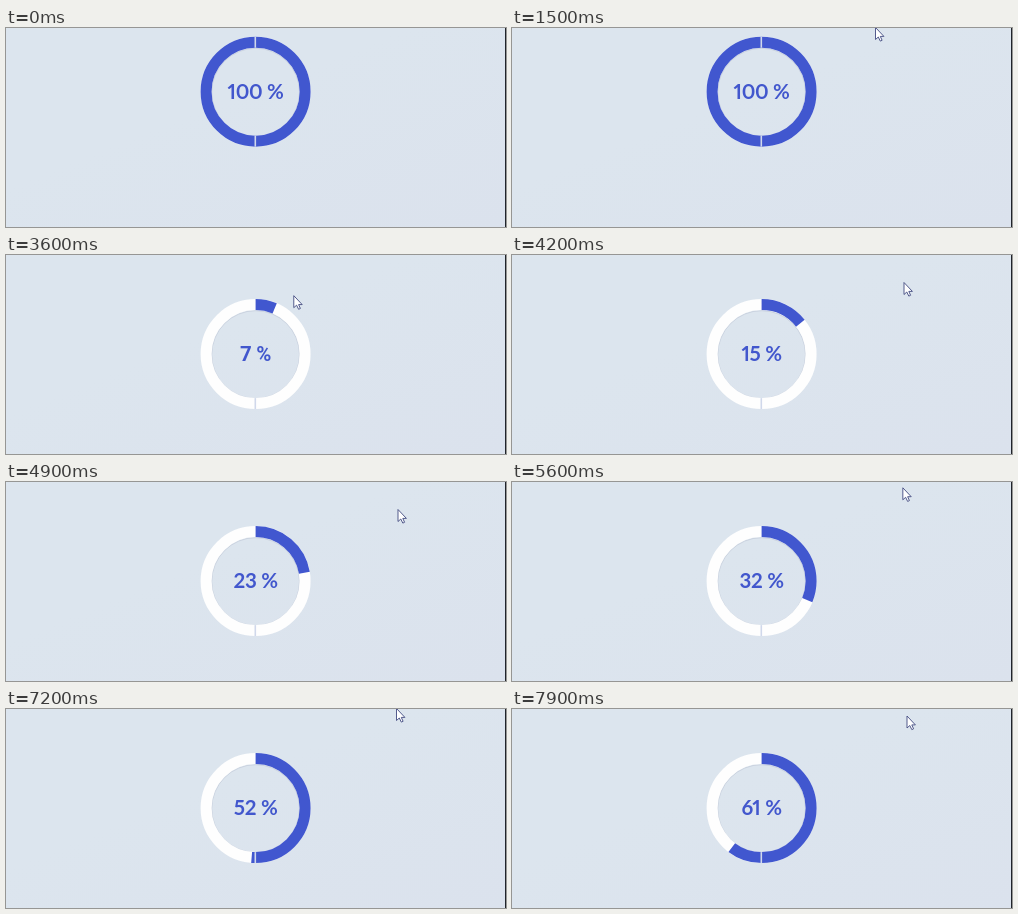
An HTML page for the animation above (8 s loop, 500x199 px).

```html
<!DOCTYPE html>
<html lang="en">
<head>
<meta charset="utf-8">
<title>Progress ring</title>
<style>
  html, body { margin: 0; width: 100%; height: 100%; overflow: hidden; background: #dce4ed; }
  svg { display: block; width: 500px; height: 199px; }
  text {
    font: 700 20.5px Lato, sans-serif;
    font-variant-numeric: proportional-nums;
    letter-spacing: -0.3px;
    fill: #4257cd;
    text-anchor: middle;
  }
  text.fallback { font: 700 20.5px Roboto, sans-serif; }
</style>
</head>
<body>
<svg viewBox="0 0 500 199">
  <defs>
    <linearGradient id="sky" x1="0" y1="0" x2="1" y2="1">
      <stop offset="0.4" stop-color="#dce5ee"/>
      <stop offset="1" stop-color="#dbe2ed"/>
    </linearGradient>
  </defs>
  <rect width="500" height="199" fill="url(#sky)"/>
  <rect x="499" width="1" height="199" fill="#20242b"/>
  <g id="ring" fill="none">
    <circle r="43.9" cy="0.5" stroke="#cbd3e0"/>
    <circle r="49.5" stroke="#fefefe" stroke-width="11"/>
    <circle id="arc" r="49.5" stroke="#4157cf" stroke-width="11" pathLength="100" transform="rotate(-90)"/>
    <g stroke="#d0d8eb" stroke-width="1.6">
      <path id="topSeam" d="M-0.3-55V-44"/>
      <path d="M-0.3 44V55"/>
    </g>
    <text id="label" y="7.1"></text>
  </g>
  <path id="cursor" d="M0 0V12L2.8 9.5L4.8 13.6L6.6 12.8L4.8 8.9H8.4Z" fill="#fff" stroke="#424a80" stroke-width="0.9" stroke-linejoin="round"/>
</svg>
<script>
  const LOOP = 8000, STEP = 100, RELOAD = 3100, MS_PER_PERCENT = 80, BOW = 0.09;
  const [ring, arc, topSeam, label, cursor] =
    ['ring', 'arc', 'topSeam', 'label', 'cursor'].map(id => document.getElementById(id));

  const entry = { x: 345, y: -16 };
  const moves = [
    { at: 1000, lasts: 500, x: 363.5, y: -0.5 },
    { at: 2100, lasts: 500, x: 64.5, y: -9 },
    { at: 3000, lasts: 880, x: 392, y: 27.5 },
    { at: 4900, lasts: 900, x: 390.5, y: -0.5 },
    { at: 7400, lasts: 500, x: 395, y: 7 }
  ];

  // Each move runs on from the last; wide sweeps sag downwards.
  function pointerAt(t) {
    return moves.reduce((from, to) => {
      const u = Math.min(1, Math.max(0, (t - to.at) / to.lasts));
      const dx = to.x - from.x;
      const sag = BOW * Math.abs(dx) * Math.sin(Math.PI * u);
      return { x: from.x + dx * u, y: from.y + (to.y - from.y) * u + sag };
    }, entry);
  }

  function draw(time) {
    const t = Math.floor((time % LOOP) / STEP) * STEP;
    const full = t < RELOAD;
    const percent = full ? 100 : Math.floor((t - 3000) / MS_PER_PERCENT);
    const pointer = pointerAt(t);

    ring.setAttribute('transform', `translate(249.6 ${full ? 63.7 : 99.1})`);
    arc.setAttribute('stroke-dasharray', full ? 'none' : `${percent - 0.7} 200`);
    topSeam.style.display = full ? '' : 'none';
    label.textContent = `${percent} %`;
    label.setAttribute('class', percent < 10 ? 'fallback' : '');
    cursor.setAttribute('transform', `translate(${pointer.x} ${pointer.y})`);
  }

  const start = performance.now();
  function tick() {
    draw(performance.now() - start);
    requestAnimationFrame(tick);
  }
  tick();
</script>
</body>
</html>
```
